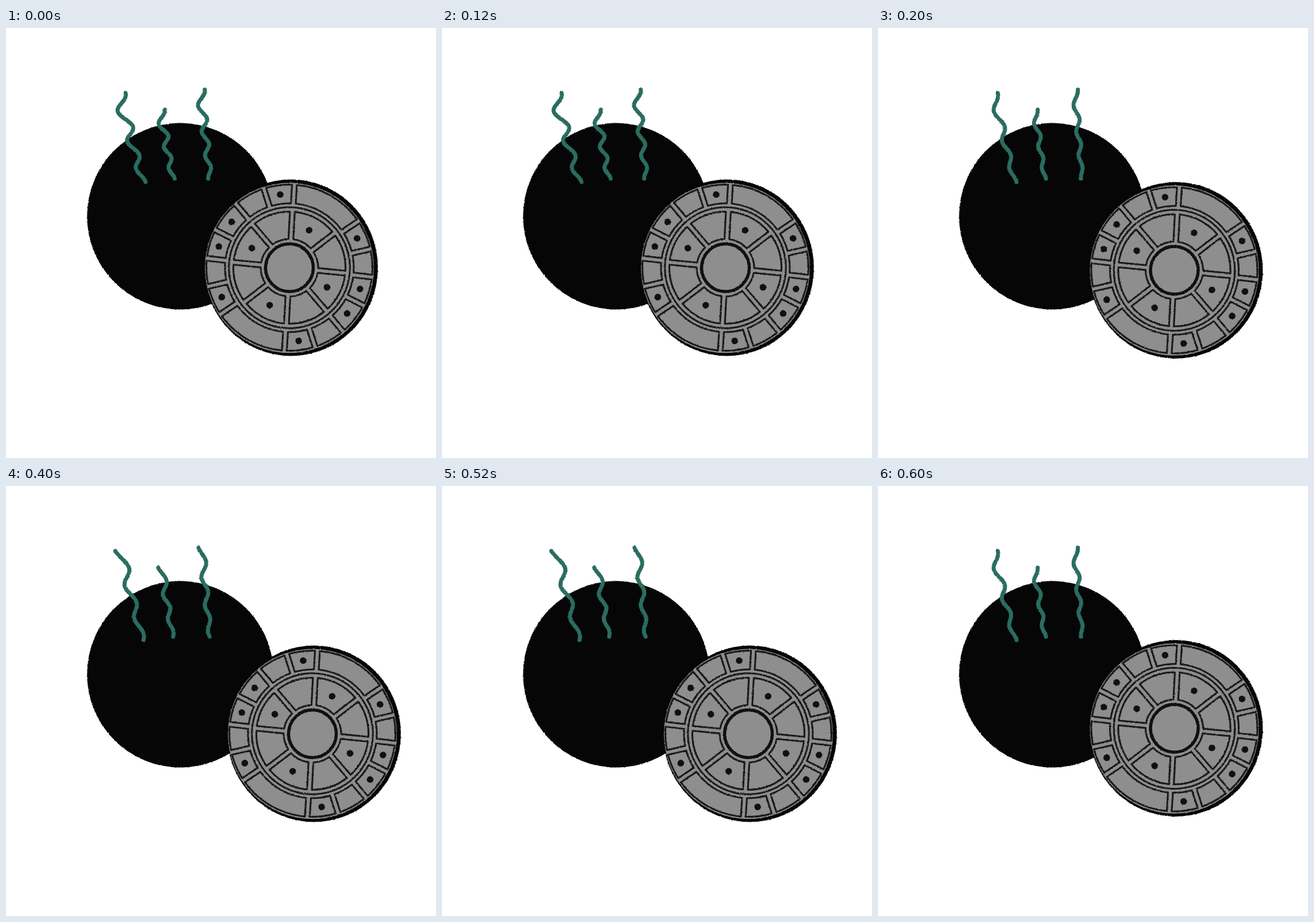
An HTML page that plays this animation: 748 by 748 pixels, repeating every 0.8 s.

```html
<!DOCTYPE html>
<html>
<head>
<meta charset="utf-8">
<style>
  html, body { margin: 0; width: 100%; height: 100%; overflow: hidden; background: #fff; }
  svg { display: block; width: 100vw; height: 100vh; }
</style>
</head>
<body>
<svg viewBox="0 0 748 748">
  <defs>
    <filter id="rough" color-interpolation-filters="sRGB">
      <feTurbulence type="fractalNoise" baseFrequency=".45" numOctaves="2" seed="4"/>
      <feDisplacementMap in="SourceGraphic" scale="2.6" xChannelSelector="R" yChannelSelector="G"/>
    </filter>
  </defs>
  <circle cx="303.2" cy="327.5" r="162.2" fill="#060606" filter="url(#rough)"/>
  <g id="lid">
    <g filter="url(#rough)">
      <ellipse cx="2.7" cy="0" rx="151.2" ry="153.5" fill="#060606"/>
      <ellipse cx="0" cy=".3" rx="147" ry="148" fill="#8e8e8e"/>
      <g fill="none" stroke="#191919" stroke-width="3.1" stroke-linejoin="round">
        <path id="cells"/>
        <circle r="105.3"/>
        <circle r="41.5" stroke-width="5.5" stroke="#101010"/>
      </g>
      <path id="dots" stroke="#101010" stroke-width="11.5" stroke-linecap="round"/>
    </g>
  </g>
  <g filter="url(#rough)">
    <path id="steam" fill="none" stroke="#2a6d60" stroke-width="7" stroke-linecap="round" stroke-linejoin="round"/>
  </g>
</svg>
<script>
const el = id => document.getElementById(id);

// Point at an angle in degrees and a radius, moved sideways by a few pixels.
const polar = (deg, r, side = 0) => {
  const a = deg * Math.PI / 180 + side / r;
  return (r * Math.cos(a)).toFixed(1) + ' ' + (r * Math.sin(a)).toFixed(1);
};

// Ring of outlined cells: the gap angles of one half turn repeat on the other,
// and the cells whose index is in `marked` carry a dot.
function ring(half, inner, outer, gap, marked) {
  let cells = '', dots = '';
  for (const turn of [0, 180]) {
    half.forEach((angle, i) => {
      const a = angle + turn, b = (half[i + 1] ?? half[0] + 180) + turn;
      cells += `M${polar(a, inner, gap)}L${polar(a, outer, gap)}` +
        `A${outer} ${outer} 0 0 1 ${polar(b, outer, -gap)}` +
        `L${polar(b, inner, -gap)}A${inner} ${inner} 0 0 0 ${polar(a, inner, gap)}Z`;
      if (marked.includes(i)) dots += `M${polar((a + b) / 2, (inner + outer) / 2)}h.01`;
    });
  }
  return { cells, dots };
}

const rings = [
  ring([-86.5, -34, -13, 6.5, 27, 50, 72], 112, 144.5, 4.2, [1, 3, 4, 6]),
  ring([-87, -37.5, 5.5, 49.5], 50, 97.5, 4.2, [0, 2])
];
el('cells').setAttribute('d', rings.map(r => r.cells).join(''));
el('dots').setAttribute('d', rings.map(r => r.dots).join(''));

const wisps = [
  { from: [198, 113], to: [238, 268], amp: 12, waves: 3 },
  { from: [270, 142], to: [290, 262], amp: 8, waves: 3 },
  { from: [340, 107], to: [355, 262], amp: 8, waves: 3.5 }
];
const poses = [
  { lid: [493, 417], swing: 1, lean: -2, shift: 0 },
  { lid: [515.5, 421.5], swing: .65, lean: 2.5, shift: 0 },
  { lid: [533, 431], swing: .8, lean: 0, shift: .4 }
];
const order = [0, 1, 2, 1];

// A wave that tightens and flattens on its way down.
function wisp({ from, to, amp, waves }, { swing, lean, shift }) {
  const points = [];
  for (let u = 0; u <= 1.001; u += 1 / 50) {
    const turns = (waves - shift) * u ** 1.15 - shift;
    const x = from[0] + (to[0] - from[0]) * u + lean * (1 - u) +
      amp * swing * (1 - .6 * u) * Math.cos(2 * Math.PI * turns);
    points.push(x.toFixed(1) + ' ' + (from[1] + (to[1] - from[1]) * u).toFixed(1));
  }
  return 'M' + points.join('L');
}

function draw(now) {
  const pose = poses[order[Math.floor(now / 200) % order.length]];
  el('lid').setAttribute('transform', `translate(${pose.lid})`);
  el('steam').setAttribute('d', wisps.map(w => wisp(w, pose)).join(''));
  requestAnimationFrame(draw);
}
draw(0);
</script>
</body>
</html>
```
